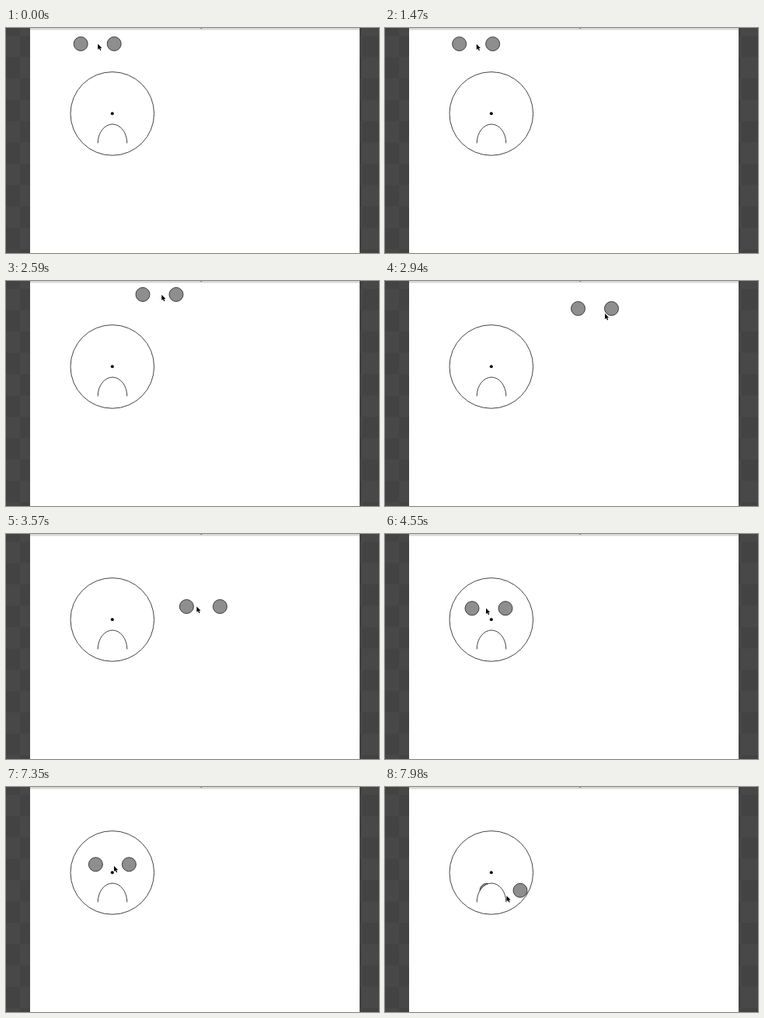
These frames come from a looping animation (480 px wide and 290 px high, 8000 ms). An HTML page:

```html
<!DOCTYPE html>
<html lang="en">
<head>
<meta charset="utf-8">
<title>Dragging the eyes</title>
<style>
  html, body { margin: 0; width: 100%; height: 100%; overflow: hidden; background: #464646; }
  svg { display: block; width: 480px; height: 290px; }
  .line { fill: #fff; stroke: #444; stroke-width: 1; }
  .eye { fill: #8e8e8e; stroke: #3c3c3c; stroke-width: 1; }
</style>
</head>
<body>
<svg viewBox="0 0 480 290">
  <defs>
    <pattern id="checker" x="18" y="10" width="55" height="55" patternUnits="userSpaceOnUse">
      <rect width="55" height="55" fill="#484848"/>
      <path d="M0 0h27.5v55h27.5v-27.5h-55z" fill="#434343"/>
    </pattern>
  </defs>
  <rect width="480" height="290" fill="url(#checker)"/>
  <rect x="31" width="424" height="290" fill="#fff"/>
  <rect x="31" width="424" height="2.5" fill="#d8d8d8"/>
  <rect x="250.5" width="1.5" height="1" fill="#666"/>

  <circle class="line" cx="136.8" cy="110.4" r="53.8"/>
  <g id="eyes">
    <circle class="eye" r="9"/>
    <circle class="eye" cx="43" r="9"/>
  </g>
  <path class="line" d="M118.2 148.5A18.8 24.5 0 0 1 155.8 148.5"/>
  <circle cx="136.8" cy="110.3" r="2"/>
  <path id="cursor" d="M0 0V7.3L1.7 5.8L3 8.5L4.2 8L3 5.3H5.2Z" stroke="#fff" stroke-width=".8" paint-order="stroke"/>
</svg>
<script>
  const LOOP = 8000, STEP = 70;

  // time, left eye x and y, pointer offset from that eye
  const path = [
    [0, 96.2, 20.4, 22, 0],
    [1400, 96.2, 20.4, 22, 0],
    [1610, 94, 21, 23, 1],
    [1820, 101, 22, 26, 0],
    [2030, 125, 20, 31, -1],
    [2170, 157, 18, 28, 0],
    [2310, 173, 17, 22, 0],
    [2520, 173, 17, 22, 0],
    [2730, 193, 20, 32, 2],
    [2940, 248.5, 35.5, 34.5, 6.5],
    [3150, 274, 61, 22, 5],
    [3360, 258.5, 83.5, 13, 3],
    [3570, 232.4, 93.5, 13, 0],
    [3710, 217.5, 94, 20, 0],
    [4060, 217.5, 94, 20, 0],
    [4340, 155, 92, 8, 0],
    [4550, 112, 95.8, 18, 0],
    [4690, 107.8, 96, 22, 0],
    [4900, 111.7, 95.5, 22, 0],
    [5110, 116, 97, 22, 0],
    [5320, 113.6, 96.3, 22.4, -.3],
    [7140, 113.6, 96.3, 22.4, -.3],
    [7560, 119, 107, 25, 5],
    [7980, 131, 133.3, 25.5, 7]
  ];

  const slope = (i, k) =>
    path[i + 1] && path[i] ? (path[i + 1][k] - path[i][k]) / (path[i + 1][0] - path[i][0]) : 0;

  // Harmonic tangents keep rests still and avoid overshoot.
  function tangent(i, k) {
    const a = slope(i - 1, k), b = slope(i, k);
    if (i === path.length - 1) return a;
    return a * b > 0 ? 2 * a * b / (a + b) : 0;
  }

  function sample(t, k) {
    let i = 0;
    while (i < path.length - 2 && path[i + 1][0] <= t) i++;
    const a = path[i], b = path[i + 1], h = b[0] - a[0];
    const u = (t - a[0]) / h, v = 1 - u;
    return v * v * (1 + 2 * u) * a[k] + u * u * (3 - 2 * u) * b[k]
      + h * u * v * (v * tangent(i, k) - u * tangent(i + 1, k));
  }

  const eyes = document.getElementById("eyes");
  const cursor = document.getElementById("cursor");
  const place = (el, x, y) => el.setAttribute("transform", `translate(${x.toFixed(2)} ${y.toFixed(2)})`);

  function draw(now) {
    const t = Math.floor((now % LOOP) / STEP) * STEP;
    const [x, y, dx, dy] = [1, 2, 3, 4].map(k => sample(t, k));
    place(eyes, x, y);
    place(cursor, x + dx, y + dy);
    requestAnimationFrame(draw);
  }
  draw(performance.now());
</script>
</body>
</html>
```
